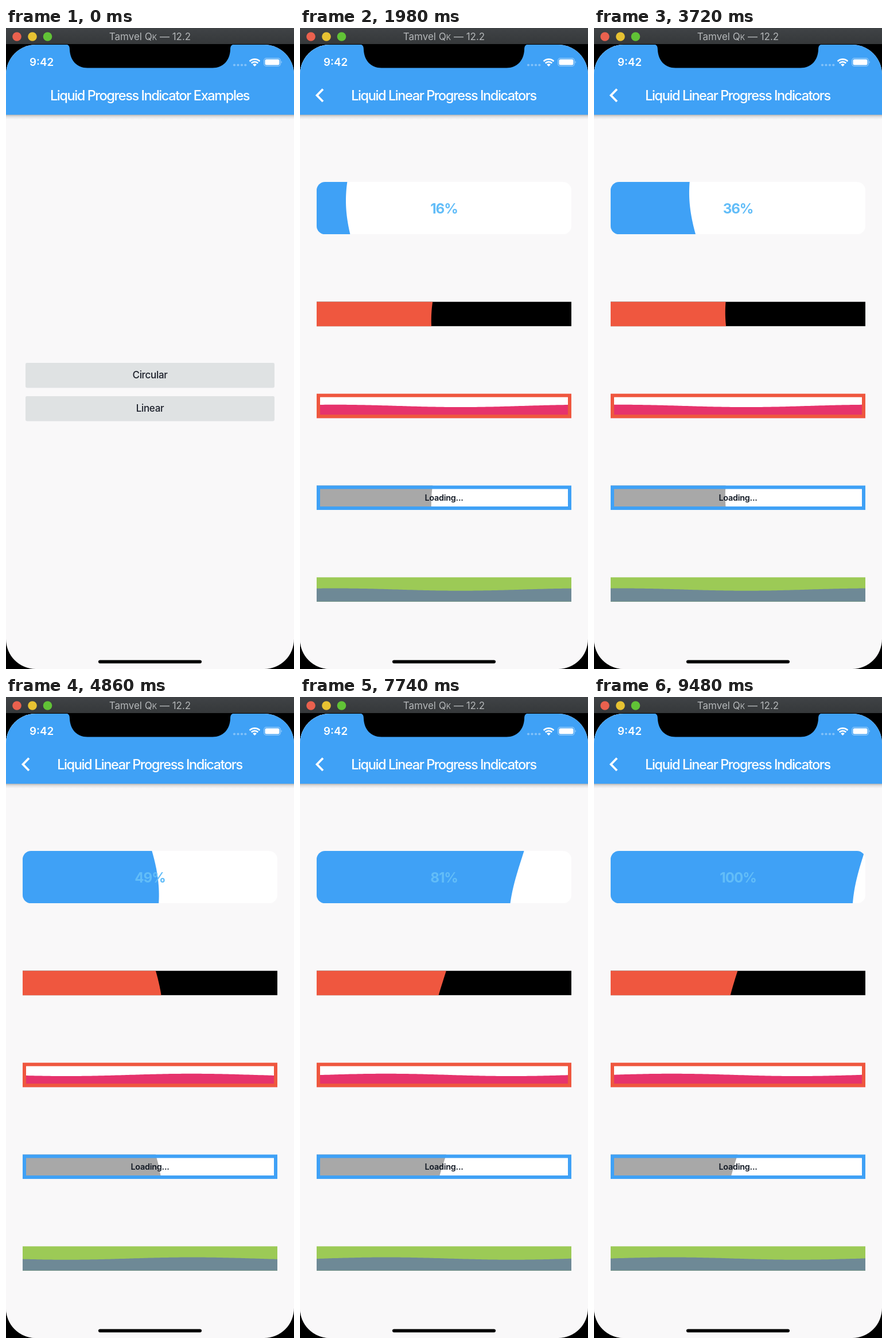
These frames come from a looping animation (502 px wide and 1116 px high, 9.54 s). An HTML page:

```html
<!DOCTYPE html>
<html lang="en">
<head>
<meta charset="utf-8">
<title>Liquid Linear Progress Indicators</title>
<style>
  html, body { margin: 0; width: 100%; height: 100%; overflow: hidden; background: #000; }
  svg { display: block; width: 502px; height: 1116px; }
  text { font-family: Inter, "Open Sans", sans-serif; }
  .mid { text-anchor: middle; }
  .title { font-size: 23.6px; font-weight: 500; letter-spacing: -1.45px; fill: #fff; }
  .button { font-size: 17px; font-weight: 500; letter-spacing: -.32px; fill: #1b1f2a; }
  .percent { font-size: 24.25px; font-weight: 700; letter-spacing: -1.1px; fill: #62bdf8; }
  .loading { font-size: 14.4px; font-weight: 600; letter-spacing: -.25px; fill: #101722; }
</style>
</head>
<body>
<svg viewBox="0 0 502 1116">
  <defs>
    <linearGradient id="chrome" x2="0" y2="1">
      <stop stop-color="#404346"/><stop offset="1" stop-color="#35383a"/>
    </linearGradient>
    <linearGradient id="shade" x2="0" y2="1">
      <stop stop-opacity=".27"/><stop offset=".4" stop-opacity=".1"/><stop offset="1" stop-opacity="0"/>
    </linearGradient>
    <clipPath id="screen"><rect y="29" width="502" height="1087" rx="52"/></clipPath>
    <clipPath id="rounded"><rect x="29" y="268" width="444" height="91.3" rx="14.5"/></clipPath>
    <g id="page">
      <rect y="29" width="502" height="1087" fill="#f9f8f9"/>
      <rect y="151" width="502" height="8" fill="url(#shade)"/>
      <rect y="29" width="502" height="122" fill="#3fa1f6"/>
    </g>
  </defs>

  <rect width="502" height="1116"/>
  <rect width="502" height="28" fill="url(#chrome)"/>
  <circle cx="19" cy="15" r="7.8" fill="#ea614e"/>
  <circle cx="46" cy="15" r="7.8" fill="#e7c232"/>
  <circle cx="72.5" cy="15" r="7.8" fill="#61c336"/>
  <text class="mid" x="251" y="21.3" font-size="17" fill="#b4b7b9">Tamvel Q<tspan font-size="12.5">K</tspan> — 12.2</text>

  <g clip-path="url(#screen)">
    <g id="home">
      <use href="#page"/>
      <text class="title mid" x="250.5" y="125.6">Liquid Progress Indicator Examples</text>
      <g fill="#dfe2e3">
        <rect x="34" y="583" width="434" height="43.5" rx="2.4"/>
        <rect x="34" y="641" width="434" height="43.5" rx="2.4"/>
      </g>
      <text class="button mid" x="251" y="610">Circular</text>
      <text class="button mid" x="251" y="668">Linear</text>
    </g>

    <g id="detail">
      <use href="#page"/>
      <path d="M40 106.500L29.500 117.200L40 128" fill="none" stroke="#fff" stroke-width="3.800"/>
      <text class="title mid" x="250.5" y="125.6">Liquid Linear Progress Indicators</text>
      <g id="bars"></g>
      <text class="percent mid" id="percent" x="251" y="322.8"></text>
      <text class="loading mid" x="251" y="822.8">Loading...</text>
    </g>

    <path d="M103 28C109 29 111 31 111 38C112 57 124 69.500 142 69.500H360C378 69.500 390 57 391 38C391 31 393 29 399 28Z"/>
    <text x="41" y="66.4" font-size="18.8" font-weight="600" fill="#fff">9:42</text>
    <g fill="#fff">
      <g opacity=".35">
        <circle cx="398" cy="64.500" r="2.100"/><circle cx="404.500" cy="64.500" r="2.100"/>
        <circle cx="411" cy="64.500" r="2.100"/><circle cx="417.300" cy="64.500" r="2.100"/>
      </g>
      <path d="M433.500 67L430.200 63.700A4.700 4.700 0 0 1 436.800 63.700Z"/>
      <g fill="none" stroke="#fff" stroke-width="2.700">
        <path d="M427.800 61.300A8.100 8.100 0 0 1 439.200 61.300"/>
        <path d="M424.700 58A12.500 12.500 0 0 1 442.300 58"/>
      </g>
      <rect x="449.700" y="52.700" width="28.600" height="13.600" rx="4" fill="none" stroke="#fff" stroke-opacity=".45" stroke-width="1.200"/>
      <rect x="451.500" y="54.500" width="25" height="10" rx="2.500"/>
      <path d="M479.600 57.300Q482 59.500 479.600 61.700Z" opacity=".5"/>
    </g>
    <rect x="161" y="1100.500" width="180" height="5.700" rx="2.850"/>
  </g>
</svg>

<script>
const LOOP = 9540, STEP = 60;
const OPEN = 498, SLIDE = 270;          // page push: start and length
const FILL = 8990, WAVE = FILL / 5;     // progress run and one wave cycle
const WIDTH = 502, POINT = WIDTH / 414; // pixels per layout point
const LEFT = 29, BAR = 444;

const byId = id => document.getElementById(id);
const add = (tag, attrs) => {
  const node = document.createElementNS('http://www.w3.org/2000/svg', tag);
  for (const key in attrs) node.setAttribute(key, attrs[key]);
  return byId('bars').appendChild(node);
};

const bars = [
  { y: 268, points: 75, back: '#fff', front: '#3fa1f6', sideways: true, clip: 'url(#rounded)' },
  { y: 476.7, points: 35, back: '#000', front: '#ef573f', sideways: true },
  { y: 636.7, points: 35, back: '#fff', front: '#e6336c', border: '#ef573f' },
  { y: 796.6, points: 35, back: '#fff', front: '#a8a8a8', border: '#3fa1f6', sideways: true },
  { y: 956.4, points: 35, back: '#9cca56', front: '#6e8996' }
];

for (const bar of bars) {
  bar.height = bar.points * POINT;
  const box = { x: LEFT, y: bar.y, width: BAR, height: bar.height };
  const clip = bar.clip ? { 'clip-path': bar.clip } : {};
  add('rect', { ...box, ...clip, fill: bar.back });
  bar.wave = add('path', { ...clip, fill: bar.front });
  if (bar.border) {
    add('rect', {
      x: LEFT + 3, y: bar.y + 3, width: BAR - 6, height: bar.height - 6,
      fill: 'none', stroke: bar.border, 'stroke-width': 6
    });
  }
}

// One degree of sine per layout point, amplitude 1/20 of the filled side.
function wavePath({ y, height, points, sideways }, value, angle) {
  const sine = i => Math.sin((angle - i) * Math.PI / 180) / 20;
  const length = sideways ? points : BAR / POINT;
  const count = Math.ceil(length / 3);
  const edge = Array.from({ length: count + 1 }, (_, k) => {
    const i = k * length / count;
    const at = sideways
      ? [Math.min(LEFT + BAR, Math.max(LEFT, LEFT + BAR * (value + sine(i)))), y + i * POINT]
      : [LEFT + i * POINT, y + height * (1 - value + sine(i))];
    return at.map(n => n.toFixed(2)).join(' ');
  });
  const bottom = y + height;
  const rest = sideways ? `H${LEFT}V${y}Z` : `V${bottom}H${LEFT}Z`;
  return `M${edge.join('L')}${rest}`;
}

function bezier(x1, y1, x2, y2) {
  const axis = (a, b, s) => 3 * a * s * (1 - s) ** 2 + 3 * b * s * s * (1 - s) + s ** 3;
  return x => {
    let low = 0, high = 1;
    for (let n = 0; n < 24; n++) {
      const mid = (low + high) / 2;
      if (axis(x1, x2, mid) < x) low = mid; else high = mid;
    }
    return axis(y1, y2, low);
  };
}
const slideEase = bezier(.35, .91, .33, .97);

function render(t) {
  const elapsed = Math.max(0, t - OPEN);
  const part = Math.min(1, elapsed / SLIDE);
  const slide = part === 0 || part === 1 ? part : slideEase(part);
  byId('home').setAttribute('transform', `translate(${-WIDTH / 3 * slide} 0)`);
  byId('detail').setAttribute('transform', `translate(${WIDTH * (1 - slide)} 0)`);

  const progress = Math.min(1, elapsed / FILL);
  const angle = elapsed / WAVE * 360;
  byId('percent').textContent = `${Math.round(progress * 100)}%`;
  bars.forEach((bar, n) => bar.wave.setAttribute('d', wavePath(bar, n ? .5 : progress, angle)));
}

const start = performance.now();
function tick() {
  const t = (performance.now() - start) % LOOP;
  render(Math.floor(t / STEP) * STEP);
  requestAnimationFrame(tick);
}
tick();
</script>
</body>
</html>
```
